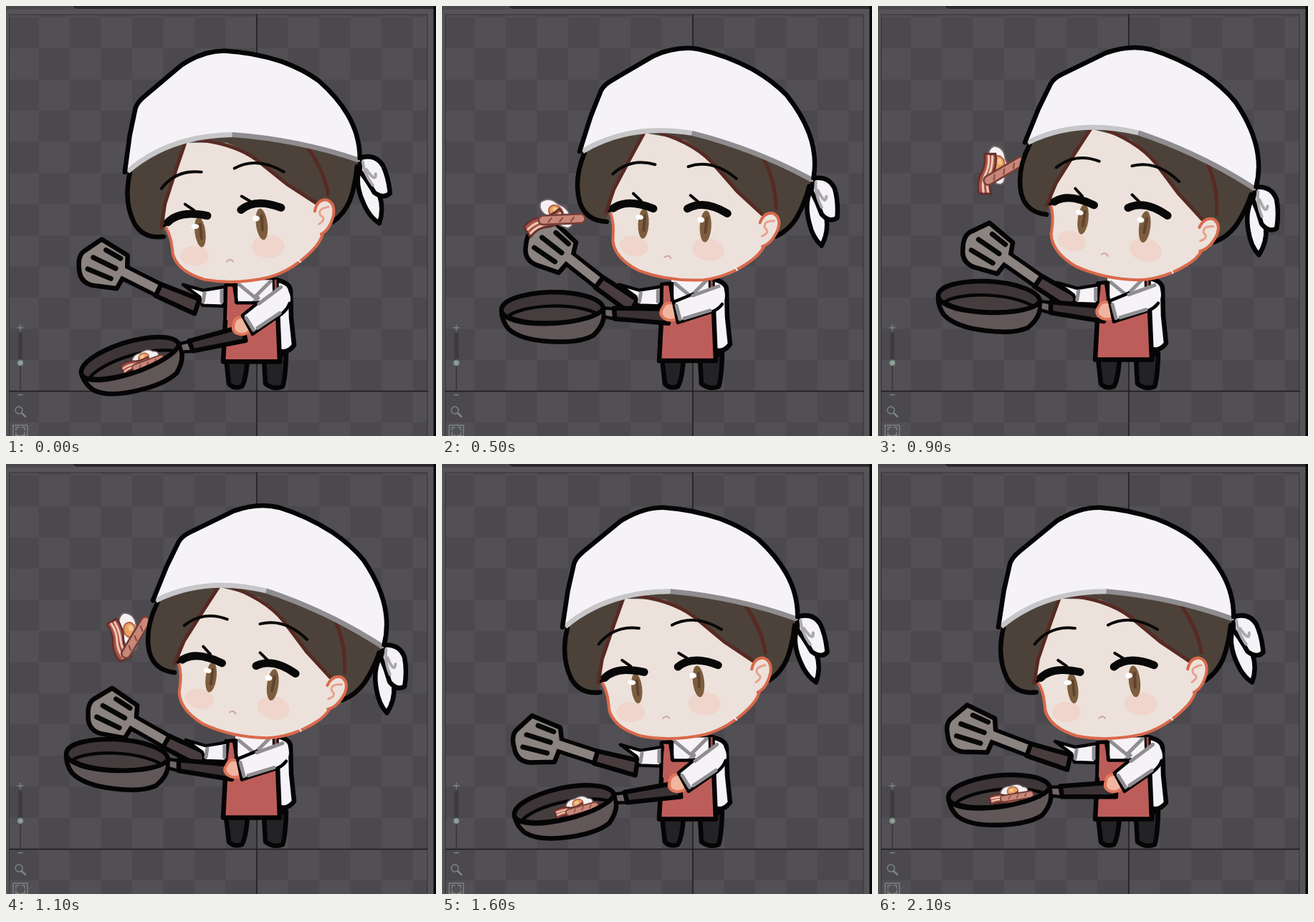
Animation, 600 px wide and 600 px high, one loop 2.2 s. Source, as an HTML page:

```html
<!DOCTYPE html>
<html lang="en">
<head>
<meta charset="utf-8">
<title>Little cook</title>
<style>
html, body { margin: 0; width: 100%; height: 100%; overflow: hidden; background: #4b494d; }
svg { display: block; width: 100vw; height: 100vh; }
.ink { stroke: #050505; stroke-width: 6.5; }
.thin { stroke-width: 4.5; }
.line { fill: none; }
.grey { fill: none; stroke: #908e91; stroke-width: 5; }
</style>
</head>
<body>
<svg viewBox="0 0 600 600" stroke-linejoin="round" stroke-linecap="round">
  <defs>
    <pattern id="checks" x="45.5" y="59" width="87" height="87" patternUnits="userSpaceOnUse">
      <path fill="#524f55" d="M0 0H87V87H0z"/>
      <path fill="#4b494d" d="M0 0H43.5V43.5H0zM43.5 43.5H87V87H43.5z"/>
    </pattern>
  </defs>

  <!-- editor canvas -->
  <path fill="#565459" d="M0 0H600V600H0z"/>
  <path fill="#4b494d" d="M0 0H95V5H0z"/>
  <path fill="#2b292c" d="M94 0H597V4H99Q95 4 94 0z"/>
  <path fill="url(#checks)" stroke="#353338" d="M5 12H588V602H5z"/>
  <path fill="#0b0a0b" d="M596.500 0H600V600H596.500z"/>
  <path class="line" stroke="#1d1b1e" stroke-width="1.5" d="M350 12V600M5 537.500H588"/>
  <g class="line" stroke="#7b8782" stroke-width="1.4">
    <path stroke="#3d3b3f" stroke-width="6" d="M20 459V495"/>
    <path stroke="#3d3b3f" stroke-width="2" d="M20 498V535"/>
    <path d="M16 449H24M20 445V453M17 542.500H23"/>
    <circle cx="20" cy="498" r="4" fill="#8da198" stroke="#66756e"/>
    <circle cx="18" cy="564" r="5"/>
    <path stroke-width="2.500" d="M22 568L27 573"/>
    <path d="M10 585H30V600H10zM14 592V588H18M22 588H26V592M14 595V599H18M22 599H26V595"/>
  </g>

  <!-- legs -->
  <g class="ink" fill="#232226">
    <path d="M307 492L311 527Q318 535 329 531Q335 522 337 492z"/>
    <path d="M360 492L362 527Q373 536 386 531Q390 520 391 485z"/>
  </g>

  <g id="body">
    <path class="ink" fill="#f5f3f7" d="M307 390L378 382Q396 386 397 396L398 435L402 473Q393 485 381 481L306 470z"/>
    <path fill="#f5f3f7" d="M320 382H374L372 412H320z"/>
    <path class="grey" d="M325 388L347 406L369 384M352 407L343 415"/>
    <path class="ink thin" fill="#bd5d5a" d="M307 389H318L322 414H378L382 496H303L306 430z"/>
    <path class="line ink" d="M379 425L382 496H303L306 440"/>
    <path class="line ink thin" d="M321 388V413"/>
    <path class="ink" style="stroke-width:3" fill="#9c4c49" d="M373 380H379L380 415H374z"/>
  </g>

  <g id="spatula">
    <path class="line ink" style="stroke-width:23" d="M160 366L212 393"/>
    <path class="ink" fill="#8b8380" d="M135 322L171 345L170 366L155 391L121 386Q103 381 103 362Q101 343 112 337z"/>
    <path class="line" stroke="#8b8380" stroke-width="12" d="M155 363L212 393"/>
    <path class="line" stroke="#080808" stroke-width="7" d="M141 337L161 349M123 347L154 363M115 363L147 377"/>
    <path class="ink" fill="#493c3e" d="M217 386L270 408L263 428L209 402z"/>
  </g>
  <g id="sleeve">
    <path class="ink thin" fill="#f5f3f7" d="M247 388L275 396L306 391L303 418L274 417L270 405z"/>
    <path class="grey" d="M277 400L275 412M301 397V412"/>
  </g>

  <g class="pan">
    <path class="ink" fill="#3d3537" d="M84 405C84 390 115 383 153 384C192 386 225 398 226 412C225 424 190 427 155 427C115 425 84 418 84 405z"/>
    <path class="ink thin" fill="#463d3f" d="M93 413C112 400 180 398 219 420C180 432 115 427 93 413z"/>
  </g>

  <g id="food">
    <g id="egg">
      <path fill="#f4f0f1" stroke="#6d6264" stroke-width="2" d="M-24 2Q-20 -12 -4 -10Q12 -15 20 -5Q32 -2 26 8Q10 14 -4 11Q-20 14 -24 2z"/>
      <ellipse rx="10" ry="8" fill="#e9a263" stroke="#b9614e" stroke-width="2"/>
      <ellipse cx="-2" cy="-2" rx="4" ry="3" fill="#f3c88d"/>
    </g>
    <g id="bacon">
      <path fill="#a9514a" stroke="#612f2d" stroke-width="2.500" d="M-27 -8Q-12 -13 0 -8T26 -7L28 8Q12 12 0 7T-26 9z"/>
      <path class="line" stroke="#edc8b3" stroke-width="3" d="M-24 -2Q-12 -6 0 -2T24 -1M-23 4Q-12 0 0 3T24 4"/>
    </g>
    <g id="sausage">
      <rect x="-31" y="-6" width="62" height="12" rx="6" fill="#c98779" stroke="#733f38" stroke-width="2.500"/>
      <path class="line" stroke="#854b42" stroke-width="2" d="M-18 3L-14 -2M-3 3L1 -2M12 3L16 -2"/>
    </g>
  </g>

  <g class="pan">
    <path class="ink" fill="#615758" d="M84 407C92 421 120 427 158 428C190 428 218 423 226 413Q229 433 209 449Q188 458 150 453Q108 448 92 431Q84 420 84 407z"/>
    <path class="ink thin" fill="#70676a" d="M227 412L241 414L240 428L226 424z"/>
    <path class="ink" fill="#3b3234" d="M241 413L318 420L315 440L241 428z"/>
  </g>

  <g id="arm">
    <path fill="#efb59f" stroke="#df765b" stroke-width="4" d="M325 417Q312 412 308 422Q302 430 309 436Q316 442 327 438z"/>
    <path fill="#f5f3f7" d="M386 391L324 414L329 443L374 429Q395 421 395 405Q395 393 386 391z"/>
    <path class="line ink thin" d="M350 403L323 414L329 443L376 428Q386 424 391 417"/>
    <path class="grey" d="M386 392L350 405M327 419L332 438M338 437L374 426"/>
  </g>

  <g id="head">
    <path fill="#ece2db" d="M222 304C229 318 231 327 233 346Q240 370 277 381Q320 391 367 379Q401 369 428 341Q438 330 442 318L440 275L400 190H250L220 280z"/>
    <path class="line" stroke="#d9694b" stroke-width="4" d="M222 306C229 318 231 327 233 346Q240 370 277 381Q320 389 367 378Q401 368 428 340Q438 330 442 318"/>
    <path fill="#4c4239" d="M253 182L238 226L222 278L219 322Q188 327 175 294Q166 275 173 230z"/>
    <path class="line ink" d="M173 232Q164 272 179 302Q192 325 220 321"/>
    <path fill="#4c4239" d="M252 180Q317 185 350 214L389 246L433 276Q446 265 457 275Q463 287 454 302Q475 292 484 265L491 215Q390 174 252 180z"/>
    <path class="line ink" d="M490 224Q488 249 480 271Q472 290 456 301"/>
    <path class="line" stroke="#572a23" stroke-width="5" d="M251 188L238 226L222 275L217 308M258 185Q316 189 350 214L392 248L432 274M422 199Q444 229 450 263"/>
    <path fill="#ece2db" stroke="#d9694b" stroke-width="4" d="M431 286Q434 270 447 270Q460 274 457 292Q452 312 440 318"/>
    <path class="line" stroke="#e8a18e" stroke-width="3" d="M450 280Q434 283 439 292Q448 297 437 304"/>

    <ellipse cx="263" cy="348" rx="20" ry="14" fill="#efd5cc"/>
    <ellipse cx="366" cy="335" rx="23" ry="16" fill="#efd5cc"/>
    <path class="line" stroke="#d1a49a" stroke-width="2" d="M308 356Q313 351 317 356"/>
    <path class="line" stroke="#f5f3f7" stroke-width="2" d="M408 354L411 357"/>
    <ellipse cx="271" cy="315" rx="7.500" ry="21" transform="rotate(-7 271 315)" fill="#7d5d3e"/>
    <ellipse cx="357" cy="304" rx="8" ry="22" transform="rotate(-7 357 304)" fill="#7d5d3e"/>
    <path class="line" stroke="#5e4330" stroke-width="4" d="M271 304L273 324M357 292L358 312"/>
    <ellipse cx="264" cy="307" rx="5.500" ry="3.500" fill="#fff"/>
    <ellipse cx="349" cy="296" rx="5" ry="4" fill="#fff"/>
    <g class="line" stroke="#080808" stroke-width="4">
      <path stroke-width="11" d="M226 301Q242 284 281 292M328 284Q348 267 384 281"/>
      <path d="M262 284L250 276M341 272L329 265M225 301L221 306"/>
      <path d="M217 254Q238 227 273 231M319 226Q350 209 388 231"/>
    </g>

    <path class="ink" fill="#f5f3f7" d="M493 228Q487 249 499 275Q507 294 521 303Q528 283 521 263L505 236z"/>
    <path class="ink" fill="#f5f3f7" d="M494 212Q515 205 526 222Q534 239 536 261Q527 270 514 260Q505 244 494 230z"/>
    <path class="line" stroke="#aaa8ac" stroke-width="4" d="M498 217Q500 234 512 250M503 228Q517 247 516 234"/>
    <path fill="#f5f3f7" d="M167 231L173 180L181 142L192 126L245 82Q275 62 305 62Q345 64 385 77Q415 88 437 104Q463 127 477 151Q497 187 494 217Q410 184 318 178Q225 176 167 231z"/>
    <path class="line" stroke="#c7c6c8" stroke-width="7" stroke-linecap="butt" d="M170 230Q228 180 317 179"/>
    <path class="line" stroke="#8f8d90" stroke-width="7" stroke-linecap="butt" d="M316 179Q409 186 493 215"/>
    <path class="line ink" d="M166 231L173 180L181 142Q184 133 194 125L245 82Q275 62 305 62Q345 64 385 77Q415 88 437 104Q463 127 477 151Q494 180 494 212"/>
  </g>
</svg>
<script>
const LOOP = 2200, STEP = 100, TOSS = 300, CATCH = 1600;
const $ = id => document.getElementById(id);
const pans = document.querySelectorAll('.pan');

// Smooth 0 to 1 between two times.
function ease(t, from, to) {
  const u = Math.min(1, Math.max(0, (t - from) / (to - from)));
  return u * u * (3 - 2 * u);
}

const wave = (t, peak) => Math.cos((t - peak) / LOOP * 2 * Math.PI);

const place = (el, x, y, turn = 0, px = 0, py = 0) =>
  el.setAttribute('transform', `translate(${x} ${y}) rotate(${turn} ${px} ${py})`);

function drawFood(t, pan) {
  const u = (t - TOSS) / (CATCH - TOSS);
  const slide = u < 1 ? ease(t, 100, TOSS) : 0;
  let x = pan.x + 16 - 27 * slide, y = pan.y + 4 - 7 * slide;
  if (u > 0 && u < 1) {
    x = 150 + 30 * u;
    y = Math.min(y, 228 + 250 * Math.abs((t - 900) / 675) ** 2.5);
  }
  $('food').setAttribute('transform', `translate(${x} ${y}) scale(${.75 + .3 * slide})`);

  const air = Math.min(1, Math.max(0, u)), lean = pan.tilt * (1 - slide);
  place($('egg'), 4, -8, lean + 80 * Math.sin(Math.PI * air));
  place($('bacon'), -11, 6, lean - 180 * air);
  place($('sausage'), 12, 2, lean - 180 * air ** 2.3);
}

function draw(t) {
  const windup = Math.max(0, Math.sin(Math.PI * Math.min(1, (t + 100) / 700)));
  const up = ease(t, 300, 600) - ease(t, 1100, 1500);
  const reach = ease(t, 100, 400) - ease(t, 1300, 1600);
  const lift = ease(t, 200, 500) - ease(t, 1250, 1650);
  const settle = ease(t, 1300, 1600), recover = ease(t, 1700, 2150);

  const dip = 3.5 * windup - 3 * up - 1;
  place($('head'), 0, dip, .8 + 13.4 * up - 2.1 * windup, 332, 369);
  place($('body'), 0, dip * .6);
  place($('arm'), 0, dip * .6, -17 * (1 - reach), 385, 400);

  const push = 2.5 * (1 - wave(t, 100)) ** 2;
  const drop = 3 * windup - push * up / 2 + 6 * settle - 8 * recover;
  place($('spatula'), push, drop, .5 + 10.5 * wave(t, 600) - 3 * recover, 266, 419);
  place($('sleeve'), push * .4, drop * .6);

  // The pan turns about the grip; its bowl lies 163 left of and 20 above it.
  const tilt = -16 * (1 - lift) - 10 * windup + 7 * recover;
  const gx = 318 + 15 * (1 - reach), gy = 428 + 24 * (1 - reach) + 6 * windup;
  const a = tilt * Math.PI / 180, c = Math.cos(a), s = Math.sin(a);
  pans.forEach(el => place(el, gx - 318, gy - 428, tilt, 318, 428));
  drawFood(t, { tilt, x: gx - 163 * c + 20 * s, y: gy - 163 * s - 20 * c });
}

const start = performance.now();
function tick() {
  const t = (performance.now() - start) % LOOP;
  draw(Math.floor(t / STEP) * STEP);
  requestAnimationFrame(tick);
}
tick();
</script>
</body>
</html>
```
